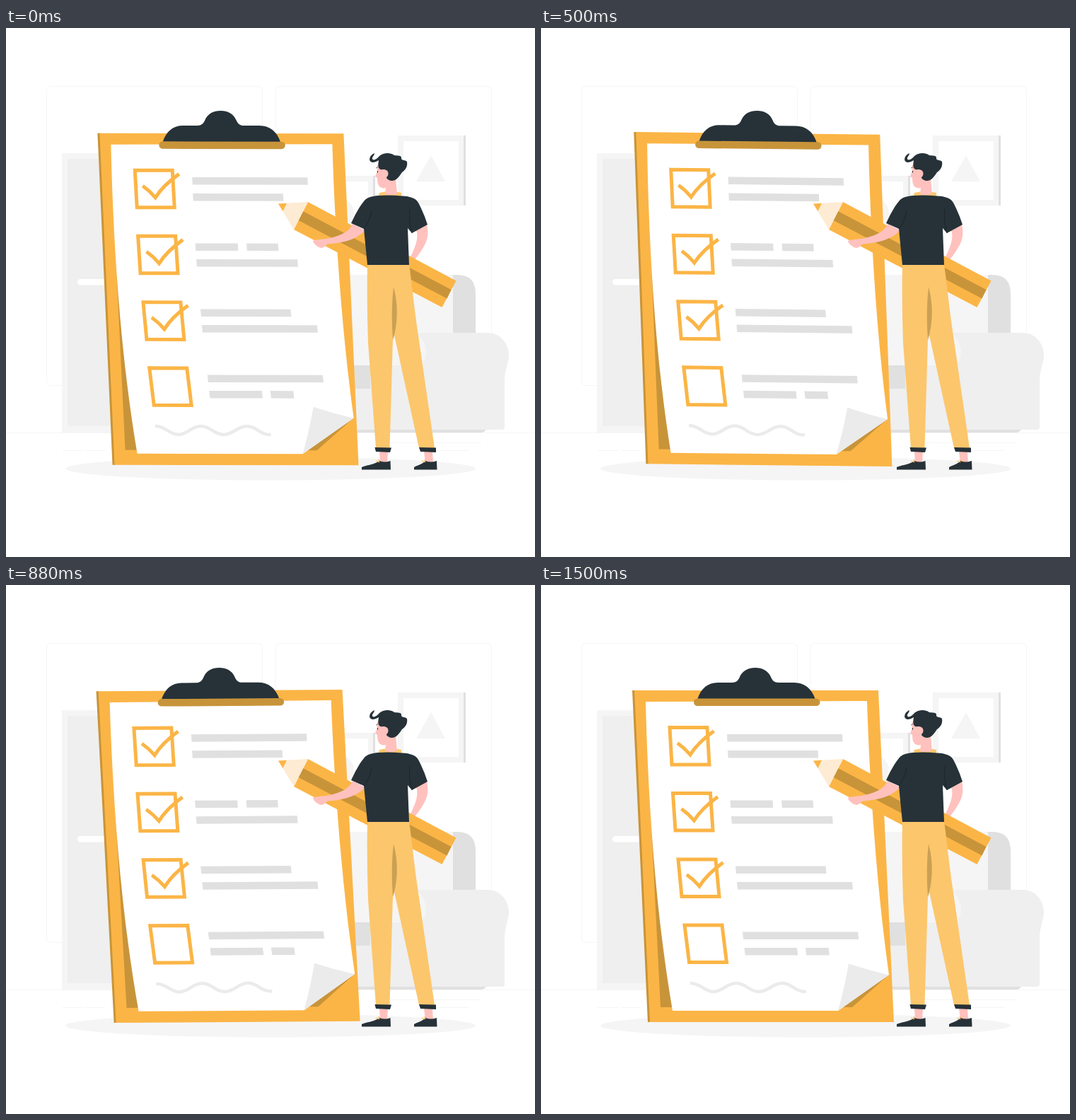
An HTML page for the animation above (1.54 s loop, 748 by 748 pixels).

```html
<!DOCTYPE html>
<html lang="en">
<head>
<meta charset="utf-8">
<title>Checklist</title>
<style>
  html, body { margin: 0; height: 100%; overflow: hidden; background: #fff; }
  svg { display: block; width: 100%; height: 100%; }
  .gold { fill: #fbb546; }
  .brown { fill: #c8943a; }
  .navy { fill: #263238; }
  .skin { fill: #ffc1bd; }
  .trousers { fill: #fcc66c; }
  .g1 { fill: #f5f5f5; }
  .g2 { fill: #efefef; }
  .g3 { fill: #e0e0e0; }
  .white { fill: #fff; }
  .line { fill: none; stroke: #f5f5f5; }
  .mark { fill: none; stroke: #fbb546; stroke-width: 5; }
</style>
</head>
<body>
<svg viewBox="0 0 748 748">
  <g id="room">
    <rect class="line" x="57.5" y="82.5" width="305" height="423" rx="6"/>
    <rect class="line" x="381" y="82.5" width="305.5" height="423" rx="6"/>
    <path class="g1" d="M79 177H300V572H79Z"/>
    <path class="g2" d="M87 185H300V563H87Z"/>
    <rect class="white" x="101" y="355" width="90" height="8.500" rx="4.250"/>

    <path class="g1" d="M554 152H647V251H554Z"/>
    <path class="g3" d="M647 152H650V251H647Z"/>
    <path class="white" d="M562 160H640V243H562Z"/>
    <path class="g1" d="M601 180L621 217H580Z"/>
    <path class="g1" d="M440 209H519V300H440Z"/>
    <path class="g3" d="M519 209H522V300H519Z"/>
    <path class="white" d="M448 217H512V292H448Z"/>
    <circle class="g1" cx="470" cy="262" r="22"/>

    <path class="g3" d="M600 349H638Q664 349 664 376V440H600Z"/>
    <path class="g1" d="M440 349H632V440H440Z"/>
    <path class="g3" d="M440 560H680Q680 572 672 572H440Z"/>
    <path class="g2" d="M440 431H681C699 431 711 446 711 463C711 474 705 482 705 502V564Q705 568 701 568H440Z"/>
    <path class="g1" d="M440 430H577Q594 440 594 460Q593 472 585 477H440Z"/>
    <path class="g3" d="M440 477H515V510H440Z"/>
    <path class="line" d="M0 572.5H748M525 586.500H672M600 597.500H655M80 597.500H110M114 597.500H140"/>
    <ellipse class="g1" cx="374" cy="623" rx="290" ry="16.500"/>
  </g>

  <g id="board">
    <path class="brown" d="M129 149H134L156 618H151Z"/>
    <path class="gold" d="M132 149H477L499 618H154Z"/>
    <path class="brown" d="M155 320L169 597H190L160 320Z"/>
    <path class="brown" d="M492 551L440 597H424Z"/>
    <path class="white" d="M148 165L461 164C465 290 475 430 492 551L420 602H186C160 450 151 290 148 165Z"/>
    <path fill="#ebebeb" d="M435 535.500Q464 545 492 551.500L420 602Q429 570 435 535.500Z"/>
    <g id="items"></g>
    <path fill="none" stroke="#ebebeb" stroke-width="4.500" d="M211 563C226 563 231 575 244 575S262 563 276 563S294 575 308 575S327 563 341 563S358 575 375 575"/>
    <path class="navy" d="M221 162C226 146 236 138 250 138H270C276 138 279 135 281 130C285 121 293 117 303 117S321 121 325 130C327 135 330 138 336 138H358C372 138 383 146 388 162Z"/>
    <rect class="brown" x="216" y="160.500" width="178.500" height="10.500" rx="5.250"/>
  </g>

  <path class="skin" d="M577 286L595 278C599 296 595 306 577 329L571 326C577 312 583 302 581 288Z"/>

  <g id="pencil">
    <path class="gold" d="M427 246L636.500 357.500L616.500 395L407 285Z"/>
    <path class="brown" d="M420 259L629.500 370L623.500 382.500L413.500 272Z"/>
    <path fill="#feebd3" d="M385 248.500L427 246L407 285Z"/>
    <path class="gold" d="M385 248.500L397 247.800L391.500 259Z"/>
  </g>

  <g id="person">
    <path class="skin" d="M490 277C485 288 475 293 458 297C448 299 438 299 434 301C434 304 440 310 446 311C450 311 452 307 455 305.500C475 304 495 300 508 286Z"/>

    <path class="skin" d="M528 599H540L539 615H529ZM591 599H603L604 615H593Z"/>
    <path class="navy" d="M503 624.500V621C510 618 522 617 528 612C533 614 538 614 543.500 612L544 624.500ZM577 624.500V621C582 618 589 617 593 612C598 614 603 614 609 612L609.500 624.500Z"/>
    <path fill="none" stroke="#fbb546" d="M523 612l5 2l-1-4M588 612l5 2l-1-4"/>
    <path class="trousers" d="M511 334H570C574 362 577 395 583 435L606 594H584L549 434L547 440L542.500 594H523L512 445Q510 390 511 334Z"/>
    <path fill="#c9a055" d="M548 366Q557 400 549 434L547 441Q544 400 548 366Z"/>
    <path class="navy" d="M521.500 593L545 593.500L543 600L523 599ZM584 593L608 593.500V600L586 599Z"/>

    <path fill="#fcc66c" d="M528 233Q543 229 559 233V239H526Z"/>
    <path class="skin" d="M525 193L524.500 203L522 210L525 212C525 222 528 228 537 226L536 235Q545 238 553 234L551 212L547 198Z"/>
    <path class="navy" d="M520.500 177C513 181 512 189 518 190C522 190 525 188 527 187C526 193 526 197 528 199C531 202 534 198 538 202V212C540 216 548 218 553 213C556 210 558 207 560 204C566 200 568 195 567 189C564 186 561 188 559 185C560 179 553 181 549 180C542 175 533 177 528 181C524 186 519 188 518 185C517 182 522 180 520.500 177Z"/>
    <ellipse class="skin" cx="536" cy="206" rx="4.500" ry="5.500"/>
    <path fill="none" stroke="#263238" d="M523.500 198l2-1.500M525.500 202v2.500"/>

    <path class="navy" d="M526 237Q543 236 560 237.500C572 238 580 241 583 247Q591 262 596 278L574 290L568 283L570 335H511L506 284L488 276Q497 256 506 245C511 239 517 238 526 237Z"/>
    <path fill="none" stroke="#1b252a" d="M517 258Q515 273 506 284M571 256Q569 273 574 290"/>
  </g>
</svg>

<script>
const items = document.getElementById("items");
const board = document.getElementById("board");

const addPath = (name, d) => {
  items.insertAdjacentHTML("beforeend", `<path class="${name}" d="${d}"/>`);
};

// box corner, sideways lean, then where its tick starts
const boxes = [
  [182, 201.5, 3, 193, 223.5],
  [186.5, 294.5, 3.5, 198.5, 316.5],
  [194, 388, 5, 206, 409.5],
  [203, 481, 6.5]
];
for (const [x, y, lean, tickX, tickY] of boxes) {
  addPath("mark", `M${x} ${y}h53l${lean} 52.500h-53Z`);
  if (tickX) addPath("mark", `M${tickX} ${tickY}q10 7 18 16.500q11-17.500 33.500-33.500`);
}

// left, right and top of each line of writing
const bars = [
  [263, 426, 211], [264, 391.5, 234],
  [267.5, 327.5, 304.5], [340, 384.5, 304.5], [269, 412, 327],
  [275, 402.5, 397.5], [277, 440, 420],
  [285, 448, 490.5], [287.5, 362, 513], [374, 406.5, 513]
];
for (const [left, right, top] of bars) {
  const lean = top / 400;
  addPath("g3", `M${left} ${top}H${right}l${lean} 10.500H${left + lean}Z`);
}

const LOOP = 1540;
const STEPS = 37;

function draw(now) {
  const step = Math.floor(now % LOOP / LOOP * STEPS);
  const phase = (step + 1) / STEPS;
  // triangle wave through 0, 1, 0, -1 degrees
  const angle = 1 - Math.abs(4 * ((phase + 0.25) % 1) - 2);
  board.setAttribute("transform", `rotate(${angle} 314 368)`);
  requestAnimationFrame(draw);
}
draw(performance.now());
</script>
</body>
</html>
```
